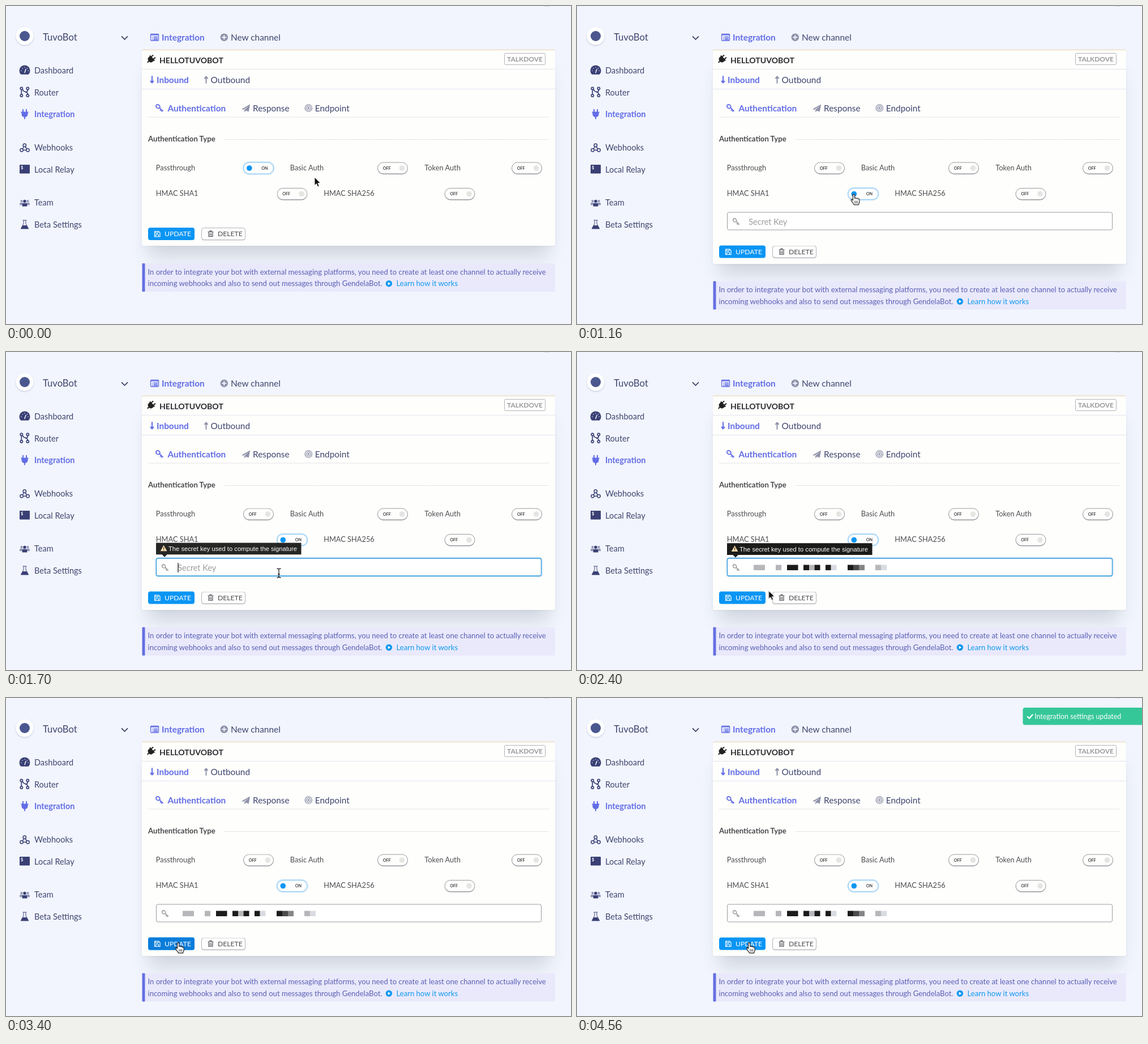
Write an HTML page that moves like this. It is 998 by 561 pixels and loops after 5.86 s.

```html
<!DOCTYPE html>
<html lang="en">
<head>
<meta charset="utf-8">
<title>Integration settings</title>
<style>
  html, body { margin: 0; width: 100%; height: 100%; overflow: hidden; background: #f2f5fd; }
  .panel, svg.stage { position: absolute; left: 0; top: 0; }
  .panel {
    left: 240px; top: 77px; width: 730px; height: 346px; box-sizing: border-box;
    background: #fefefc; border-top: 1px solid #ebd7b2; border-radius: 3px;
    box-shadow: 0 30px 30px -12px rgba(50, 65, 85, .18), 0 1px 4px rgba(50, 65, 85, .06);
  }
  text { font-family: Lato, sans-serif; fill: #3f456f; white-space: pre; }
  .nav text { font-size: 14.5px; }
  .tabs text { font-size: 15.4px; }
  .form text { font-size: 12.8px; fill: #4d4d52; }
  .info text { font-size: 13.08px; fill: #5b60b4; }
  .btn text { font-size: 12.2px; fill: #4a4a4e; }
  text.on { font-weight: 700; fill: #626de6; }
  .form text.head { font-weight: 700; font-size: 13.15px; fill: #48484c; }
  text.state, .form text.state { font-size: 7.2px; font-weight: 700; fill: #444; }
  .line { fill: none; stroke: currentColor; stroke-linecap: round; stroke-linejoin: round; }

  /* one shared clock: 5860 ms */
  .panel, .low, .old, .new, .idle, .press, .field, .focus, .caret, .hint, .value, .tip,
  .down, .toast, .cursor, .arrow, .hand, .beam { animation: 5.86s step-end infinite; }

  .panel { animation-name: grow; }
  .low { animation-name: shift; }
  .old { animation-name: old; }
  .new, .field { animation-name: new; }
  .idle { animation-name: idle; }
  .press { animation-name: press; }
  .focus { animation-name: focus; animation-timing-function: linear; }
  .caret { animation-name: caret; }
  .hint { animation-name: hint; }
  .value { animation-name: value; }
  .tip { animation-name: tip; animation-timing-function: linear; }
  .down { animation-name: down; animation-timing-function: linear; }
  .toast { animation-name: toast; }
  .cursor { animation-name: travel; animation-timing-function: ease-in-out; }
  .arrow { animation-name: arrow; }
  .hand { animation-name: hand; }
  .beam { animation-name: beam; }

  @keyframes grow { 0% { height: 346px } 18.1%, 100% { height: 378px } }
  @keyframes shift { 0% { transform: none } 18.1%, 100% { transform: translateY(31.5px) } }
  @keyframes old { 0% { opacity: 1 } 18.1%, 100% { opacity: 0 } }
  @keyframes new { 0% { opacity: 0 } 18.1%, 100% { opacity: 1 } }
  @keyframes idle { 0% { opacity: 1 } 13.6%, 100% { opacity: 0 } }
  @keyframes press { 0% { opacity: 0 } 13.6% { opacity: 1 } 18.1%, 100% { opacity: 0 } }
  @keyframes focus { 0%, 22.8% { opacity: 0 } 24.2%, 51.7% { opacity: 1 } 54%, 100% { opacity: 0 } }
  @keyframes caret { 0% { opacity: 0 } 25.4% { opacity: 1 } 34%, 100% { opacity: 0 } }
  @keyframes hint { 0% { opacity: 1 } 34%, 100% { opacity: 0 } }
  @keyframes value { 0% { opacity: 0 } 34%, 100% { opacity: 1 } }
  @keyframes tip {
    0%, 27.3% { opacity: 0; transform: translateY(-4px) }
    29% { opacity: .95; transform: translateY(-.8px) }
    30.7%, 51.7% { opacity: 1; transform: none }
    56.5%, 100% { opacity: 0; transform: none }
  }
  @keyframes down { 0%, 51.2% { opacity: 0 } 52.7%, 68.8% { opacity: 1 } 70.5%, 100% { opacity: 0 } }
  @keyframes toast {
    0% { transform: translateX(216px) }
    68.8% { transform: translateX(216px); animation-timing-function: cubic-bezier(.2, .7, .3, 1) }
    77.3%, 100% { transform: none }
  }
  @keyframes travel {
    0%, 5.1% { transform: translate(545px, 302px) }
    8.5%, 19.1% { transform: translate(489px, 330px) }
    23.9%, 35.8% { transform: translate(482px, 390px) }
    40.95% { transform: translate(338.5px, 421px) }
    46.6%, 100% { transform: translate(304px, 432px) }
  }
  @keyframes arrow {
    0% { opacity: 1 } 7.2% { opacity: 0 } 20.6% { opacity: 1 } 21.8% { opacity: 0 }
    37.3% { opacity: 1 } 42.2%, 100% { opacity: 0 }
  }
  @keyframes hand { 0% { opacity: 0 } 7.2% { opacity: 1 } 20.6% { opacity: 0 } 42.2%, 100% { opacity: 1 } }
  @keyframes beam { 0% { opacity: 0 } 21.8% { opacity: 1 } 37.3%, 100% { opacity: 0 } }
</style>
</head>
<body>
<div class="panel"></div>
<svg class="stage" width="998" height="561" viewBox="0 0 998 561">
  <defs>
    <filter id="soft" x="-20%" y="-40%" width="140%" height="180%"><feGaussianBlur stdDeviation="1.3"/></filter>
    <g id="off">
      <rect x=".5" y="1.3" width="53" height="20.2" rx="10.1" fill="#8f8f95"/>
      <rect x=".5" y=".5" width="53" height="20" rx="10" fill="#fefefd" stroke="#9a9aa0"/>
      <circle cx="43.5" cy="10.5" r="4.8" fill="#e6e5e4"/>
      <text class="state" x="9.7" y="13">OFF</text>
    </g>
    <g id="on">
      <rect x="-.5" y="-.5" width="55" height="22" rx="11" fill="#a9d8fa" filter="url(#soft)"/>
      <rect x=".5" y=".5" width="53" height="20" rx="10" fill="#fefefe" stroke="#7fc2f3"/>
      <circle cx="10.8" cy="10.5" r="4.8" fill="#0c96f3"/>
      <text class="state" x="32.3" y="13">ON</text>
    </g>
    <g id="plug" fill="currentColor">
      <path d="M-4-8.5h2V-4h-2zM2-8.5h2V-4h-2zM-6.5-4h13v2h-1v2.500C5.500 3.500 3.500 5 1 5.400V9h-2V5.400C-3.500 5-5.500 3.500-5.500.5V-2h-1z"/>
    </g>
    <g id="key" class="line">
      <ellipse cx="-2.6" cy="-2.2" rx="3.7" ry="3" transform="rotate(40 -2.6 -2.2)" stroke-width="1.8"/>
      <path d="M.2.2 6 5.600M3 3l-1.500 1.700M5 4.800 3.700 6.200" stroke-width="1.8"/>
    </g>
    <g id="person" fill="currentColor">
      <circle cy="-3" r="2.700"/><path d="M-4.300 6V2.800Q-4.300.4-2 .4H2Q4.300.4 4.300 2.800V6z"/>
    </g>
  </defs>

  <ellipse cx="955" cy="-2" rx="8" ry="3" fill="#d3d6e0"/>

  <!-- sidebar -->
  <circle cx="33" cy="54.500" r="16" fill="#b9c0d6" opacity=".55" filter="url(#soft)"/>
  <circle cx="33" cy="53" r="15.500" fill="#fff"/>
  <circle cx="33" cy="53" r="9" fill="#4b588f"/>
  <text x="65" y="61" font-size="16.600">TuvoBot</text>
  <path class="line" d="M204.500 53.800l5 5.200 5-5.200" stroke-width="1.700" color="#353b63"/>

  <g class="nav" color="#3a4075">
    <path d="M26.300 120.800a9.500 9.500 0 1 1 13.400 0z" fill="currentColor"/>
    <path class="line" d="M33 117.500l2-6" stroke-width="1.500" color="#f2f5fd"/>
    <path class="line" d="M27 114h0M29 109.800h0M33 108h0M37.500 109.800h0M39.300 114h0" stroke-width="1.700" color="#c8cde6"/>
    <text x="50" y="119.300">Dashboard</text>

    <g class="line" stroke-width="1.700">
      <circle cx="27.300" cy="145.500" r="2.100"/><circle cx="38.300" cy="145.500" r="2.100"/>
      <circle cx="27.300" cy="158" r="2.100"/><circle cx="38.300" cy="158" r="2.100"/>
      <path d="M27.300 147.800v8M38.300 155.800c0-6-8-3-8.800-8.500M38.300 147.800c0 3-1.500 4-3.300 4.600"/>
    </g>
    <text x="50" y="158">Router</text>

    <use href="#plug" x="33" y="190.500" color="#626de6"/>
    <text class="on" x="50" y="196.200">Integration</text>

    <g class="line" stroke-width="1.500">
      <circle cx="32.800" cy="245.800" r="2.700"/><circle cx="27.600" cy="254.300" r="2.700"/><circle cx="38.500" cy="254.300" r="2.700"/>
      <path d="M31.300 248.500l-2 3.500M34.300 248.500l2.300 3.500M30.800 254.300h4.500"/>
    </g>
    <text x="50" y="255">Webhooks</text>

    <rect x="24" y="280" width="18" height="15.500" rx="1" fill="currentColor"/>
    <text x="26" y="287.500" style="font-size:7.500px;font-weight:700;fill:#fff">$</text>
    <text x="50" y="293.700">Local Relay</text>

    <g color="#9398b8"><use href="#person" transform="translate(27.500 346.500) scale(.8)"/><use href="#person" transform="translate(38.500 346.500) scale(.8)"/></g>
    <use href="#person" x="33" y="347.500"/>
    <text x="50" y="352.300">Team</text>

    <path class="line" d="M30 378h6M31 378v6l-4.500 8.500h13l-4.500-8.500v-6" stroke-width="1.300" opacity=".7"/>
    <path d="M29.500 387h7l3.500 6.300h-14z" fill="currentColor"/>
    <text x="50" y="391">Beta Settings</text>
  </g>

  <!-- tabs -->
  <g class="tabs">
    <g color="#626de6">
      <rect class="line" x="255.500" y="49.500" width="14" height="11.500" rx="1" stroke-width="1.300"/>
      <path class="line" d="M256 51h13M258.500 54.500h0M258.500 57h0M258.500 59.300h0M261 54.500h6.500M261 57h6.500M261 59.300h6.500" stroke-width="1.500"/>
      <path class="line" d="M258 124v10.500M255.500 132.500l2.500 3 2.500-3" stroke-width="2"/>
      <use href="#key" x="271" y="179.500"/>
    </g>
    <text class="on" x="275" y="61">Integration</text>
    <g color="#8e91a8">
      <circle cx="385.300" cy="55.300" r="6.700" fill="currentColor"/>
      <path class="line" d="M382 55.300h6.600M385.300 52v6.600" stroke-width="1.900" color="#f2f5fd"/>
      <path class="line" d="M353.500 136v-10.500M351 127.500l2.500-3 2.500 3" stroke-width="2"/>
      <path d="M416 182l15-8.500-2.300 13-5-2-2.500 3.200v-4.500l7.500-7-9 6.600z" fill="currentColor"/>
      <g class="line" stroke-width="1.300"><circle cx="534.300" cy="180" r="6.200"/><circle cx="534.300" cy="180" r="3.700"/></g>
      <circle cx="534.300" cy="180" r="1.800" fill="currentColor"/>
    </g>
    <text x="397" y="61">New channel</text>
    <path d="M240 111.500h730" stroke="#e4e6ed"/><path d="M240 146.500h730" stroke="#dfe3f1"/><path d="M251 196h708" stroke="#e3e4e9"/>
    <use href="#plug" transform="translate(256 94) rotate(48) scale(.95)" color="#222"/>
    <text x="271" y="100.500" style="font-size:14.100px;font-weight:700;fill:#2a2a2e">HELLOTUVOBOT</text>
    <rect x="880.500" y="83.500" width="72" height="20" rx="2" fill="#fefefe" stroke="#b3b3b7"/>
    <text x="916.500" y="98" text-anchor="middle" style="font-size:12px;font-weight:700;fill:#9a9a9e">TALKDOVE</text>
    <text class="on" x="266" y="135.700">Inbound</text>
    <text x="361.600" y="135.700">Outbound</text>
    <text class="on" x="285.400" y="185.500">Authentication</text>
    <text x="436" y="185.500">Response</text>
    <text x="545.800" y="185.500">Endpoint</text>
  </g>

  <!-- form -->
  <g class="form">
    <text class="head" x="251" y="239">Authentication Type</text>
    <path d="M386 235.500h573" stroke="#d9d9dc" stroke-dasharray="2 1"/>
    <text x="264.800" y="290">Passthrough</text>
    <text x="501.800" y="290">Basic Auth</text>
    <text x="739.300" y="290">Token Auth</text>
    <text x="264.800" y="335.300">HMAC SHA1</text>
    <text x="561.200" y="335.300">HMAC SHA256</text>
    <use class="old" href="#on" x="419" y="275.500"/>
    <use class="new" href="#off" x="419" y="275.500"/>
    <use href="#off" x="656" y="275.500"/>
    <use href="#off" x="893" y="275.500"/>
    <use class="idle" href="#off" x="478.500" y="321"/>
    <g class="press">
      <rect x="481" y="323" width="49.500" height="17" rx="8.500" fill="#ededed"/>
      <circle cx="522" cy="331.500" r="4.800" fill="#e4e4e4"/>
      <text class="state" x="488.200" y="334" opacity=".75">OFF</text>
    </g>
    <use class="new" href="#on" x="478.500" y="321"/>
    <use href="#off" x="774.500" y="321"/>

    <g class="field">
      <rect x="265.500" y="364" width="680" height="31" rx="3" fill="#fff" stroke="#9b9ba0"/>
      <g class="focus">
        <rect x="265" y="363.500" width="681" height="32" rx="4" fill="none" stroke="#b5dcf8" stroke-width="2.500" filter="url(#soft)"/>
        <rect x="265.500" y="364" width="680" height="31" rx="3" fill="#fff" stroke="#349bdb" stroke-width="1.300"/>
      </g>
      <use href="#key" transform="translate(281 380) scale(.9)" color="#a0a0a4"/>
      <text class="hint" x="303.300" y="385.800" style="font-size:14.500px;fill:#9c9ca0">Secret Key</text>
      <path class="caret" d="M304 372v17" stroke="#222" stroke-width="1.300"/>
      <g class="value" fill="none" stroke-width="9.500">
        <path stroke="#b7b7bb" d="M312 380.300h20M351 380.300h10M410 380.300h9.500M527 380.300h10"/>
        <path stroke="#d9dbe3" d="M448.500 380.300h10M537 380.300h10"/>
        <path stroke="#1b1b1b" d="M371 380.300h19.500M400 380.300h10M419.500 380.300h10M439 380.300h9.500M478 380.300h10"/>
        <path stroke="#4c4c4e" d="M488 380.300h10"/>
        <path stroke="#858588" d="M498 380.300h10"/>
      </g>
    </g>
    <g class="tip">
      <path d="M265 337.300h256.500v20.700H284.500l-4.500 4.500-4.500-4.500H265z" fill="#1b1b1a"/>
      <path d="M278.600 341.500l5.800 10.500h-11.600z" fill="#f6dcae"/>
      <path class="line" d="M278.600 345.500v2.800M278.600 350.300h0" stroke-width="1.300" color="#3a2a14"/>
      <text x="287" y="351.500" style="font:11.200px 'Liberation Sans',Arial,sans-serif;fill:#fff">The secret key used to compute the signature</text>
    </g>
  </g>

  <!-- everything below the fields -->
  <g class="low">
    <g class="btn">
      <rect x="251" y="391" width="82" height="22" rx="4" fill="#0a95f4"/>
      <rect class="down" x="251" y="391" width="82" height="22" rx="4" fill="#0a7dda"/>
      <path class="line" d="M262.500 397.500h7l2.500 2.500v7h-9.500zM264.500 398v2.800h4V398M264.500 406.500v-3h5v3" stroke-width="1.200" color="#fff"/>
      <text x="280" y="406" style="fill:#fff">UPDATE</text>
      <rect x="345.500" y="392" width="77" height="21.300" rx="4" fill="#a9a9b0"/>
      <rect x="345.500" y="391.500" width="77" height="21" rx="4" fill="#fefefe" stroke="#b4b4ba"/>
      <path class="line" d="M357 398.500h9M360 398v-1.300h3v1.300M358 399v7.700h7V399M360.300 401v3.700M362.700 401v3.700" stroke-width="1.200" color="#55555a"/>
      <text x="374" y="406">DELETE</text>
    </g>
    <g class="info">
      <rect x="240.500" y="454" width="729.500" height="50" rx="2" fill="#e9e9fb"/>
      <rect x="240.500" y="454" width="5" height="50" rx="1" fill="#6570e2"/>
      <text x="250.500" y="473.700">In order to integrate your bot with external messaging platforms, you need to create at least one channel to actually receive</text>
      <text x="250.500" y="494.200">incoming webhooks and also to send out messages through GendelaBot.</text>
      <circle cx="676.400" cy="489.700" r="5.700" fill="#0f98ee"/>
      <path d="M674.700 486.900l4.600 2.800-4.600 2.800z" fill="#fff"/>
      <text x="689.500" y="494.200" style="fill:#0f98ee">Learn how it works</text>
    </g>
  </g>

  <g class="toast">
    <rect x="787.500" y="17" width="220" height="30.500" rx="4" fill="#36c798"/>
    <path class="line" d="M796 33l3 3 5.500-6.500" stroke-width="2.400" color="#fff"/>
    <text x="808.300" y="37" style="font-size:12.400px;fill:#fff">Integration settings updated</text>
  </g>

  <g class="cursor">
    <path class="arrow" d="M0 0v14.500l3.300-3 2.300 5.300 2.600-1.100-2.300-5.200h4.600z" fill="#111" stroke="#fff" stroke-width=".9"/>
    <g class="hand">
      <path d="M-1.500 1.200a1.600 1.600 0 0 1 3.200 0v5.300c.3-1 3-1 3.100.5c.5-.8 2.800-.7 2.900.8c.6-.7 2.400-.4 2.400 1.100v4c0 2-1.400 3-1.600 5h-8c-.5-2-4.200-5.200-5.100-8c-.4-1.600 1.600-2 2.400-.7l.7 1z" fill="#fff" stroke="#161616" stroke-width="1.200" stroke-linejoin="round"/>
      <path class="line" d="M2 11.500v3.500M4.300 11.500v3.500M6.600 11.500v3.500" stroke-width=".9" color="#222"/>
    </g>
    <path class="beam line" d="M-3-8q3 0 3 2V6q0 2-3 2M3-8q-3 0-3 2M0 6q0 2 3 2M-1.500 2h3" stroke-width="1.300" color="#222"/>
  </g>
</svg>
</body>
</html>
```
